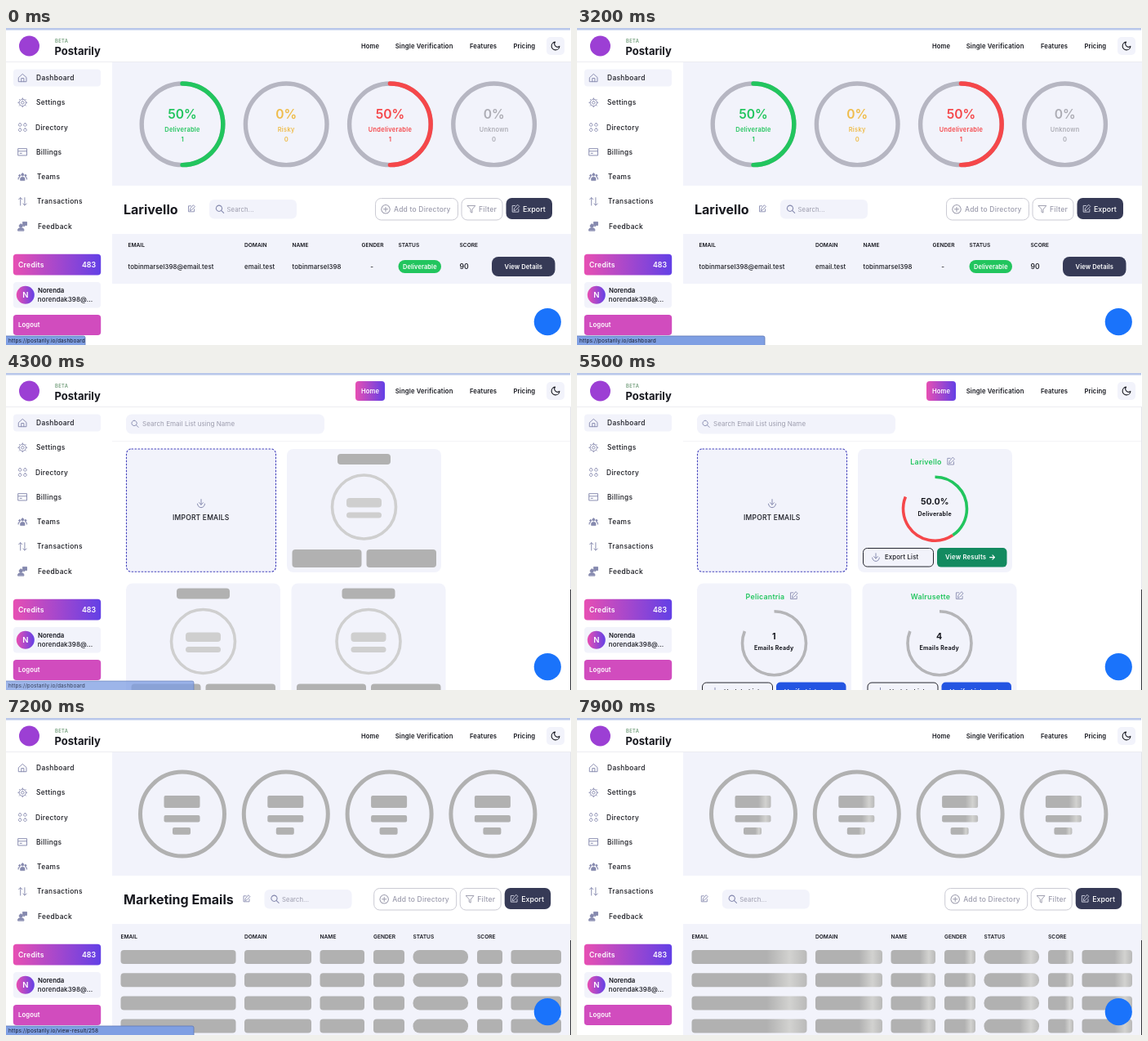
An HTML page with a canvas that plays this animation: 692 px wide and 388 px high, repeating every 8000 ms.

```html
<!DOCTYPE html>
<html lang="en">
<head>
<meta charset="utf-8">
<title>Email verification dashboard</title>
<style>
html, body { margin: 0; width: 100%; height: 100%; overflow: hidden; background: #fff; }
canvas { display: block; width: 692px; height: 388px; }
</style>
</head>
<body>
<canvas id="stage"></canvas>
<script>
const LOOP = 8000, W = 692, H = 388;
const canvas = document.getElementById('stage');
const ctx = canvas.getContext('2d');
const dpr = window.devicePixelRatio || 1;
canvas.width = W * dpr;
canvas.height = H * dpr;

const INK = '#17181f', PANEL = '#f2f3fb', MUTED = '#9c9cad', NAVY = '#363a56';
const GREEN = '#22c55e', RED = '#f5474a', TRACK = '#b6b6c2', BONE = '#b1b1b1', PALE = '#cfcfcf';
const ICON = '#8589ae', PINK = '#e74fb3', VIOLET = '#6340e6';

const ICONS = {
  home: 'M3 11 12 3l9 8v10H3zM9 21v-8h6v8',
  gear: 'M12 8.5a3.5 3.5 0 1 0 .01 0M12 4a8 8 0 1 0 .01 0M12 1.5v2M12 20.5v2M1.5 12h2M20.5 12h2M4.6 4.6l1.4 1.4M18 18l1.4 1.4M4.6 19.4 6 18M18 6l1.4-1.4',
  grid: 'M6 2.5a3.5 3.5 0 1 0 .01 0M18 2.5a3.5 3.5 0 1 0 .01 0M6 14.5a3.5 3.5 0 1 0 .01 0M18 14.5a3.5 3.5 0 1 0 .01 0',
  card: 'M2 4h20v16H2zM2 10h20M6 15h4',
  team: 'M12 4a3 3 0 1 0 .01 0M5 7a2 2 0 1 0 .01 0M19 7a2 2 0 1 0 .01 0M7 20v-4q0-3 5-3t5 3v4zM2 18v-3q0-2 3-2M22 18v-3q0-2-3-2',
  swap: 'M7 21V3L3 7M7 3l4 4M17 3v18l-4-4M17 21l4-4',
  chat: 'M8 7a4 4 0 1 0 .01 0M1 22v-2q0-4 7-4t7 4v2zM13 2h9v8h-4l-3 3v-3h-2z',
  search: 'M10 3a7 7 0 1 0 .01 0M15 15l6 6',
  edit: 'M11 4H4v16h16v-7M18 2l4 4-10 10-4 1 1-5z',
  plus: 'M12 2a10 10 0 1 0 .01 0M12 7v10M7 12h10',
  filter: 'M2 3h20l-8 9.5V21l-4-2v-6.5z',
  download: 'M12 2v13M7 10l5 5 5-5M3 13a9 9 0 0 0 18 0',
  arrow: 'M4 12h16M13 5l7 7-7 7',
  moon: 'M21 12.8A9 9 0 1 1 11.2 3a7 7 0 0 0 9.8 9.8z'
};
for (const name in ICONS) ICONS[name] = new Path2D(ICONS[name]);

const ramp = (t, from, to) => Math.min(1, Math.max(0, (t - from) / (to - from)));

function text(str, x, y, size, color = INK, weight = 500, align = 'left', spacing = 0) {
  ctx.font = `${weight} ${size}px Inter, sans-serif`;
  ctx.letterSpacing = spacing + 'px';
  ctx.textAlign = align;
  ctx.fillStyle = color;
  ctx.fillText(str, x, y + size * 0.36);
  return ctx.measureText(str).width;
}

function box(x, y, w, h, r, fill, stroke, lineWidth = 1) {
  ctx.beginPath();
  ctx.roundRect(x, y, w, h, r);
  if (fill) { ctx.fillStyle = fill; ctx.fill(); }
  if (stroke) { ctx.strokeStyle = stroke; ctx.lineWidth = lineWidth; ctx.stroke(); }
}

function disc(x, y, r, fill) {
  ctx.beginPath();
  ctx.arc(x, y, r, 0, 7);
  ctx.fillStyle = fill;
  ctx.fill();
}

// Arc between two fractions of a turn, clockwise from the top
function arc(x, y, r, from, to, color, lineWidth, cap = 'butt') {
  ctx.beginPath();
  ctx.arc(x, y, r, (from - 0.25) * 2 * Math.PI, (to - 0.25) * 2 * Math.PI);
  ctx.strokeStyle = color;
  ctx.lineWidth = lineWidth;
  ctx.lineCap = cap;
  ctx.stroke();
}

function icon(name, x, y, size, color = ICON, filled = false, weight = 2) {
  ctx.save();
  ctx.translate(x - size / 2, y - size / 2);
  ctx.scale(size / 24, size / 24);
  ctx.lineWidth = weight;
  ctx.lineCap = ctx.lineJoin = 'round';
  ctx.strokeStyle = ctx.fillStyle = color;
  if (filled) ctx.fill(ICONS[name]);
  ctx.stroke(ICONS[name]);
  ctx.restore();
}

function blend(x, w) {
  const g = ctx.createLinearGradient(x, 0, x + w, 0);
  g.addColorStop(0, PINK);
  g.addColorStop(1, VIOLET);
  return g;
}

function faded(alpha, draw) {
  if (alpha <= 0) return;
  ctx.save();
  ctx.globalAlpha = alpha;
  draw();
  ctx.restore();
}

// Placeholder bar with a light band centred at fraction k of its width
function bone(x, y, w, h, r, k, color = BONE) {
  let fill = color;
  if (k > -0.2 && k < 1.05) {
    fill = ctx.createLinearGradient(x + w * (k - 0.2), 0, x + w * (k + 0.2), 0);
    fill.addColorStop(0, color);
    fill.addColorStop(0.5, '#d2d2d0');
    fill.addColorStop(1, color);
  }
  box(x, y, w, h, r, fill);
}

function header(home) {
  ctx.fillStyle = '#ececf1';
  ctx.fillRect(0, 41, W, 1);
  ctx.fillStyle = '#b9c8ea';
  ctx.fillRect(0, 0, 691, 2.6);
  disc(28.5, 22, 12.5, '#9c3fd4');
  text('BETA', 60, 16, 5.8, '#5f9069', 500, 'left', 0.4);
  text('Postarily', 59.5, 28, 13, INK, 700);
  faded(home, () => box(428, 10, 36, 24, 4, blend(428, 36)));
  text('Home', 446, 22, 7.6, home > 0.5 ? '#fff' : INK, 600, 'center', 0.1);
  text('Single Verification', 476.7, 22, 7.7, INK, 600, 'left', 0.15);
  text('Features', 568, 22, 7.7, INK, 600, 'left', 0.1);
  text('Pricing', 621.5, 22, 7.7, INK, 600, 'left', 0.1);
  box(662, 11, 22, 22, 5, PANEL);
  icon('moon', 673, 22, 13, INK);
}

const MENU = [
  ['Dashboard', 'home', 37], ['Settings', 'gear', 37], ['Directory', 'grid', 36],
  ['Billings', 'card', 37], ['Teams', 'team', 38], ['Transactions', 'swap', 38],
  ['Feedback', 'chat', 39]
];

function sidebar(hover) {
  faded(hover, () => box(9, 50.5, 107, 21, 4, PANEL));
  MENU.forEach(([label, name, x], i) => {
    const y = 61 + i * 30.27;
    icon(name, 20.3, y, 12.5, ICON, name === 'team' || name === 'chat', 1.8);
    text(label, x, y, 8.4, INK, 500, 'left', 0.35);
  });
  box(8.8, 276.7, 107.4, 25.8, 4, blend(9, 107));
  text('Credits', 15, 289.5, 8.7, '#fff', 600, 'left', 0.2);
  text('483', 110, 289.5, 8.8, '#fff', 600, 'right');
  box(9, 311, 107, 31.5, 4, PANEL);
  disc(23.8, 326.8, 11, blend(13, 22));
  text('N', 23.8, 326.8, 9.5, '#fff', 600, 'center');
  text('Norenda', 39, 321.3, 7.8, INK, 600);
  text('norendak398@...', 38.8, 332.3, 8, INK, 500, 'left', 0.1);
  box(8.8, 351, 107.4, 25, 4, '#d14cbe');
  text('Logout', 15, 363.3, 7.7, '#fff', 600, 'left', 0.1);
}

function searchBox(x) {
  box(x, 210, 107, 23.5, 6, PANEL);
  icon('search', x + 13, 221.8, 12.5);
  text('Search...', x + 21.5, 221.8, 7.7, MUTED, 400, 'left', 0.1);
}

function toolbar(title, searchX, shift) {
  text(title, 144, 221.8, 16, INK, 700);
  icon('edit', searchX - 22, 221.3, 10.5);
  searchBox(searchX);
  ctx.save();
  ctx.translate(shift, 0);
  box(452.5, 208.5, 101, 26.5, 7, '#fff', '#cbcbd4');
  icon('plus', 465, 221.8, 12.5, MUTED);
  text('Add to Directory', 475, 221.8, 8.5, MUTED, 500, 'left', 0.2);
  box(558, 208.5, 50, 26.5, 7, '#fff', '#cbcbd4');
  icon('filter', 570, 221.8, 11.5, MUTED);
  text('Filter', 579, 221.8, 8.7, MUTED, 500, 'left', 0.2);
  box(612.5, 208, 56.5, 26, 7, NAVY);
  icon('edit', 624, 221.3, 11.5, '#c9cbdc');
  text('Export', 633, 221.3, 8.9, '#fff', 500);
  ctx.restore();
}

function columns(xs, y) {
  ['EMAIL', 'DOMAIN', 'NAME', 'GENDER', 'STATUS', 'SCORE'].forEach(
    (label, i) => text(label, xs[i], y, 6.6, INK, 600));
}

function panels(tableHeight) {
  ctx.fillStyle = PANEL;
  ctx.fillRect(130, 42, 562, 151);
  ctx.fillRect(130, 252, 562, tableHeight);
}

function resultsPage() {
  panels(61);
  const stats = [
    ['50%', 'Deliverable', 1, GREEN], ['0%', 'Risky', 0, '#efbc4b'],
    ['50%', 'Undeliverable', 1, RED], ['0%', 'Unknown', 0, '#adadb5']
  ];
  stats.forEach(([pct, label, count, color], i) => {
    const x = 216 + i * 127.2;
    arc(x, 117.8, 49.8, 0, 1, TRACK, 5.4);
    if (count) arc(x, 117.8, 49.8, 0, 0.5, color, 5.4, 'round');
    text(pct, x, 105, 15.6, color, 600, 'center');
    text(label, x, 124, 7.4, color, 600, 'center', 0.3);
    text(count, x, 136.7, 7.6, color, 600, 'center');
  });
  toolbar('Larivello', 249, 0);
  columns([149.5, 292, 350.5, 435.5, 480.5, 555.5], 265.5);
  text('tobinmarsel398@email.test', 149.5, 292.2, 7.8, INK, 500, 'left', 0.1);
  text('email.test', 292, 292.2, 7.8, INK, 500, 'left', 0.1);
  text('tobinmarsel398', 350.5, 292.2, 7.8, INK, 500, 'left', 0.1);
  text('-', 448, 292.2, 8, INK, 500, 'center');
  box(480.5, 284, 52.5, 16, 8, GREEN);
  text('Deliverable', 506.8, 292, 7.4, '#fff', 600, 'center', 0.15);
  text('90', 555.5, 292.2, 8.8);
  box(595, 280, 77.5, 24, 8, NAVY);
  text('View Details', 633.8, 292, 7.6, '#fff', 600, 'center', 0.1);
}

function resultsSkeleton(title, searchX, k) {
  panels(136);
  for (let i = 0; i < 4; i++) {
    const x = 216 + i * 126.8;
    arc(x, 117.6, 51.5, 0, 1, BONE, 5);
    bone(x - 22.5, 95, 44, 15, 2, k);
    bone(x - 22.5, 119, 44, 8.5, 2, k);
    bone(x - 12, 134, 22, 8.7, 2, k);
  }
  toolbar(title, searchX, -1.8);
  columns([140.5, 292, 384.5, 450, 498.5, 577], 267.3);
  const cells = [[140.5, 141], [292, 82], [384.5, 54.5], [450, 38], [498.5, 67.5], [577, 31], [618.5, 61.5]];
  for (let row = 0; row < 4; row++)
    cells.forEach(([x, w], i) => bone(x, 284 + row * 28.2, w, 17, i === 4 ? 8 : 4, k));
}

function cardSkeleton(x, y, k) {
  const c = x + 94.5;
  bone(c - 32.5, y + 6, 65, 13, 4, k);
  arc(c, y + 71, 39, 0, 1, PALE, 3.6);
  bone(c - 21.5, y + 60, 43, 11.5, 4, k, PALE);
  bone(c - 21.5, y + 77.5, 43, 7, 3.5, k, PALE);
  bone(x + 6.5, y + 123, 85, 22, 4, k);
  bone(x + 97.5, y + 123, 85.5, 22, 4, k);
}

function card(x, y, info, p) {
  const c = x + 94.5, end = Math.min(p, 0.9999);
  ctx.font = '600 8.8px Inter, sans-serif';
  ctx.letterSpacing = '0.25px';
  const left = c - 2.5 - (ctx.measureText(info.name).width + 17) / 2;
  const w = text(info.name, left, y + 16.3, 8.8, GREEN, 600, 'left', 0.25);
  icon('edit', left + w + 11, y + 15.2, 11.5, ICON, false, 1.8);
  if (info.split) {
    arc(c, y + 73.2, 39, 0, end / 2, GREEN, 3.6);
    arc(c, y + 73.2, 39, end / 2, end, RED, 3.6);
  } else {
    arc(c, y + 73.2, 39, 0, end, '#b5b5b8', 3.6);
  }
  text(info.value, c - 0.3, y + 64.3, 10.6, INK, 700, 'center');
  text(info.label, c - 0.3, y + 79.3, 7, INK, 700, 'center', 0.25);
  box(x + 6.5, y + 121.5, 86, 22.5, 5, null, '#25262e');
  icon('download', x + 22, y + 132.6, 11.5);
  text(info.split ? 'Export List' : 'Update List', x + 33, y + 132.6, 7.7, INK, 500, 'left', 0.2);
  box(x + 97, y + 121, 85.5, 23.6, 5, info.split ? '#138a60' : '#2455e2');
  text(info.split ? 'View Results' : 'Verify List', x + 107, y + 132.6, 7.7, '#fff', 600, 'left', 0.2);
  icon('arrow', x + 164.5, y + 132.6, 9, '#fff', false, 3);
}

const CARDS = [
  [344, 93, { name: 'Larivello', value: '50.0%', label: 'Deliverable', split: true }],
  [147, 257.5, { name: 'Pelicantria', value: '1', label: 'Emails Ready' }],
  [349.5, 257.5, { name: 'Walrusette', value: '4', label: 'Emails Ready' }]
];

function dashboardPage(t) {
  ctx.fillStyle = '#f4f4f7';
  ctx.fillRect(130, 83, 561, 1);
  box(147, 50.5, 243, 24, 7, PANEL);
  icon('search', 158, 62.3, 11);
  text('Search Email List using Name', 167, 62.3, 8, MUTED, 400, 'left', 0.05);
  ctx.setLineDash([2.5, 1.5]);
  ctx.lineCap = 'butt';
  box(147.5, 93, 183, 150.3, 6, PANEL, '#4644bd', 1.1);
  ctx.setLineDash([]);
  icon('download', 239, 159.7, 12);
  text('IMPORT EMAILS', 238.8, 176.5, 8.5, INK, 500, 'center', 0.2);
  const progress = 1 - Math.pow(1 - ramp(t, 5100, 5900), 2.4);
  for (const [x, y, info] of CARDS) {
    box(x, y, 189, 151, 8, PANEL);
    if (t < 5100) cardSkeleton(x, y, (t - 3850) / 412);
    else card(x, y, info, progress);
  }
}

function linkBar(path, compact, grow, alpha) {
  faded(alpha, () => {
    const w = compact + (230 - compact) * grow;
    box(-3, 377, w + 3, 14, 2, '#7f9fe3', '#5d77b4', 0.8);
    text('https://postarily.io/' + path, 3, 383, 6.5, '#171c2e', 400, 'left', 0.1);
  });
}

function draw(t) {
  ctx.setTransform(dpr, 0, 0, dpr, 0, 0);
  ctx.fillStyle = '#fff';
  ctx.fillRect(0, 0, W, H);

  const onDashboard = t >= 3500 && t < 7200;
  if (t < 3500) resultsPage();
  else if (onDashboard) dashboardPage(t);
  else if (t < 7300) resultsSkeleton('Marketing Emails', 316.5, -1);
  else resultsSkeleton('', 177.8, (t - 7550) / 412);

  if (t >= 3500) {
    ctx.fillStyle = '#e4e4ea';
    ctx.fillRect(691, 42, 1, 346);
    ctx.fillStyle = '#35363c';
    ctx.fillRect(691, onDashboard ? 265 : 272, 1, 123);
  }

  header(onDashboard ? ramp(t, 3500, 3800) : 0);
  sidebar(t < 2000 ? 1 - ramp(t, 100, 300) : ramp(t, 2750, 2950) - ramp(t, 5950, 6200));
  disc(663.3, 359.6, 16.6, '#1a73fb');

  if (t < 2000) linkBar('dashboard', 97, 0, 1 - ramp(t, 250, 480));
  else if (t < 5000) linkBar('dashboard', 97, ramp(t, 3050, 3200), ramp(t, 2750, 2950) - ramp(t, 4240, 4500));
  else linkBar('view-result/258', 113, ramp(t, 6880, 7000), ramp(t, 6550, 6800) - ramp(t, 7220, 7400));
}

function frame() {
  draw(performance.now() % LOOP);
  requestAnimationFrame(frame);
}
frame();
</script>
</body>
</html>
```
